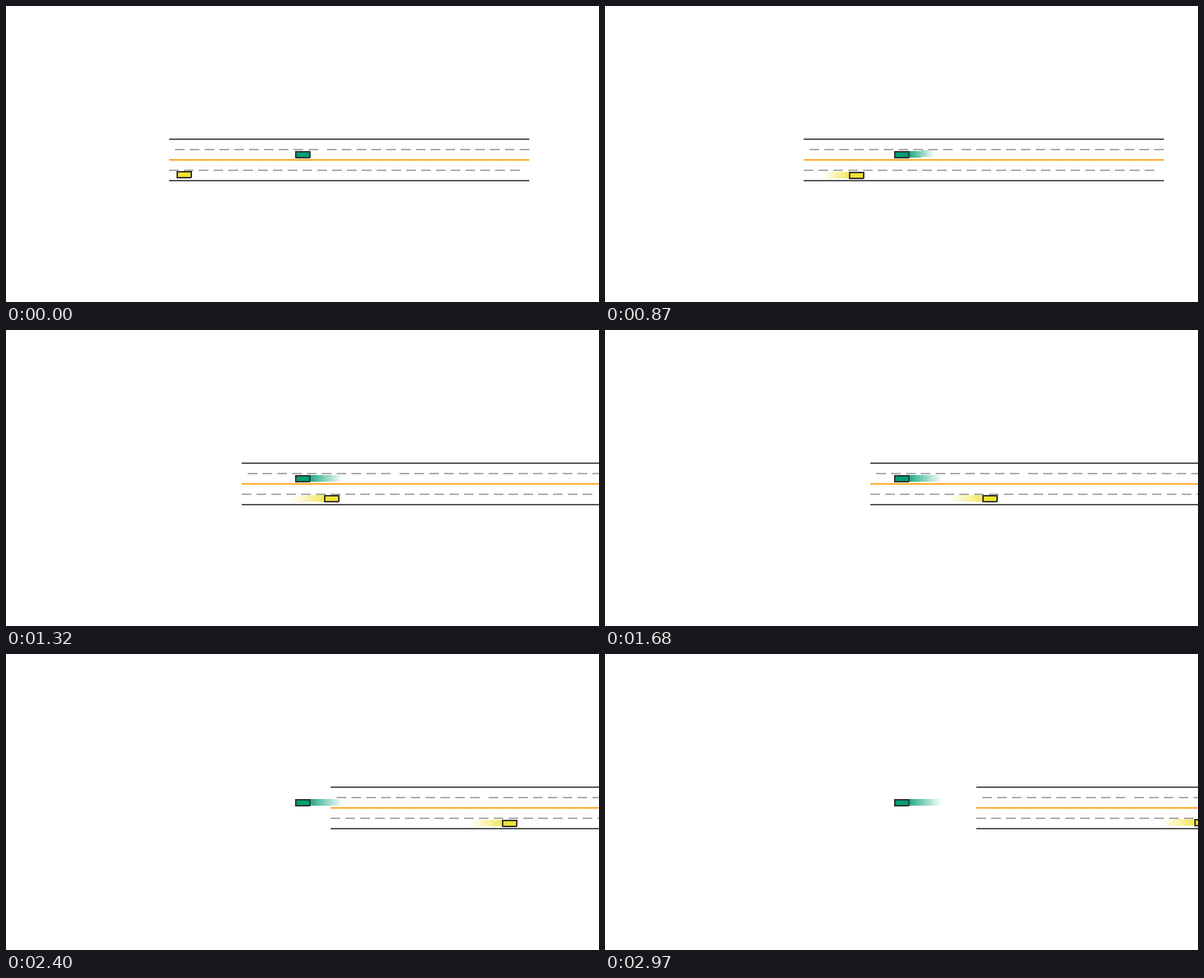
An HTML page with a canvas that plays this animation: 800x400 px, repeating every 3 s.

```html
<!DOCTYPE html>
<html lang="en">
<head>
<meta charset="utf-8">
<title>Two-way road</title>
<style>
html, body { margin: 0; width: 100%; height: 100%; overflow: hidden; background: #fff; }
canvas { display: block; }
</style>
</head>
<body>
<canvas id="stage" width="800" height="400"></canvas>
<script>
const ctx = document.getElementById('stage').getContext('2d');
const LOOP = 3000, STEP = 30, PHASE = 406, CRUISE = 1 / 9, GHOSTS = 13;

// Distance covered: slow phase, faster phase, then cruising speed
function travel(s, first, second) {
  if (s <= 0) return 0;
  if (s < PHASE) return first * s / PHASE;
  if (s < 2 * PHASE) return first + (second - first) * (s - PHASE) / PHASE;
  return second + CRUISE * (s - 2 * PHASE);
}
const greenRun = s => travel(s, 11.28, 45.11);
const yellowRun = s => travel(s, 11.4, 47.8);

// Small sideways drift of each car
const greenLift = s => s >= 200 && s < 650 ? 1 : 0;
const yellowDrop = s => (s >= 300 && s < 1080) || (s >= 2040 && s < 2670) ? 1 : 0;

function rect(color, x, y, w, h) {
  ctx.fillStyle = color;
  ctx.fillRect(x, y, w, h);
}

function dashes(x, y, count) {
  for (let i = 0; i < count; i++) rect('#aaa', x + 20 * i, y, 13, 2);
}

function road(x) {
  rect('#555', x, 179, 486, 2);
  rect('#555', x, 235, 486, 2);
  rect('#ffa726', x, 207, 486, 2);
  dashes(x + 8, 193, 10);
  dashes(x + 213, 193, 14);
  dashes(x, 221, 24);
}

function trail(color, x, dir, s, run, laneY) {
  const back = k => Math.floor(run(s)) - Math.floor(run(s - k * STEP));
  for (let k = 1; k <= GHOSTS; k++) {
    const near = back(k - 1), far = back(k);
    ctx.globalAlpha = 0.85 * (1 - (k - 0.5) / GHOSTS);
    rect(color, dir > 0 ? x + near : x - far, laneY(s - k * STEP), far - near, 9);
  }
  ctx.globalAlpha = 1;
}

function car(color, x, y, lift = 0) {
  const dark = '#333';
  rect(dark, x, y, 10, 10);
  rect(dark, x + 10, y - lift, 10, 10);
  rect(dark, x + 20, y - lift, 1, 9);
  rect(color, x + 2, y + 2, 8, 6);
  rect(color, x + 10, y + 2 - lift, 9, 6);
}

function draw(now) {
  const s = Math.max(0, Math.floor(now % LOOP / STEP) - 1) * STEP;
  const shift = greenRun(s);
  const yellowX = 230 + Math.floor(shift + yellowRun(s));
  const greenY = u => 196 - greenLift(u);
  const yellowY = u => 223 + yellowDrop(u);

  rect('#fff', 0, 0, 800, 400);
  road(220 + Math.floor(shift));
  trail('#009e73', 411, 1, s, greenRun, greenY);
  trail('#f0e442', yellowX, -1, s, yellowRun, yellowY);
  car('#009e73', 390, 196, greenLift(s));
  car('#f0e430', yellowX, yellowY(s));
}

const start = performance.now();
function tick() {
  draw(performance.now() - start);
  requestAnimationFrame(tick);
}
tick();
</script>
</body>
</html>
```
